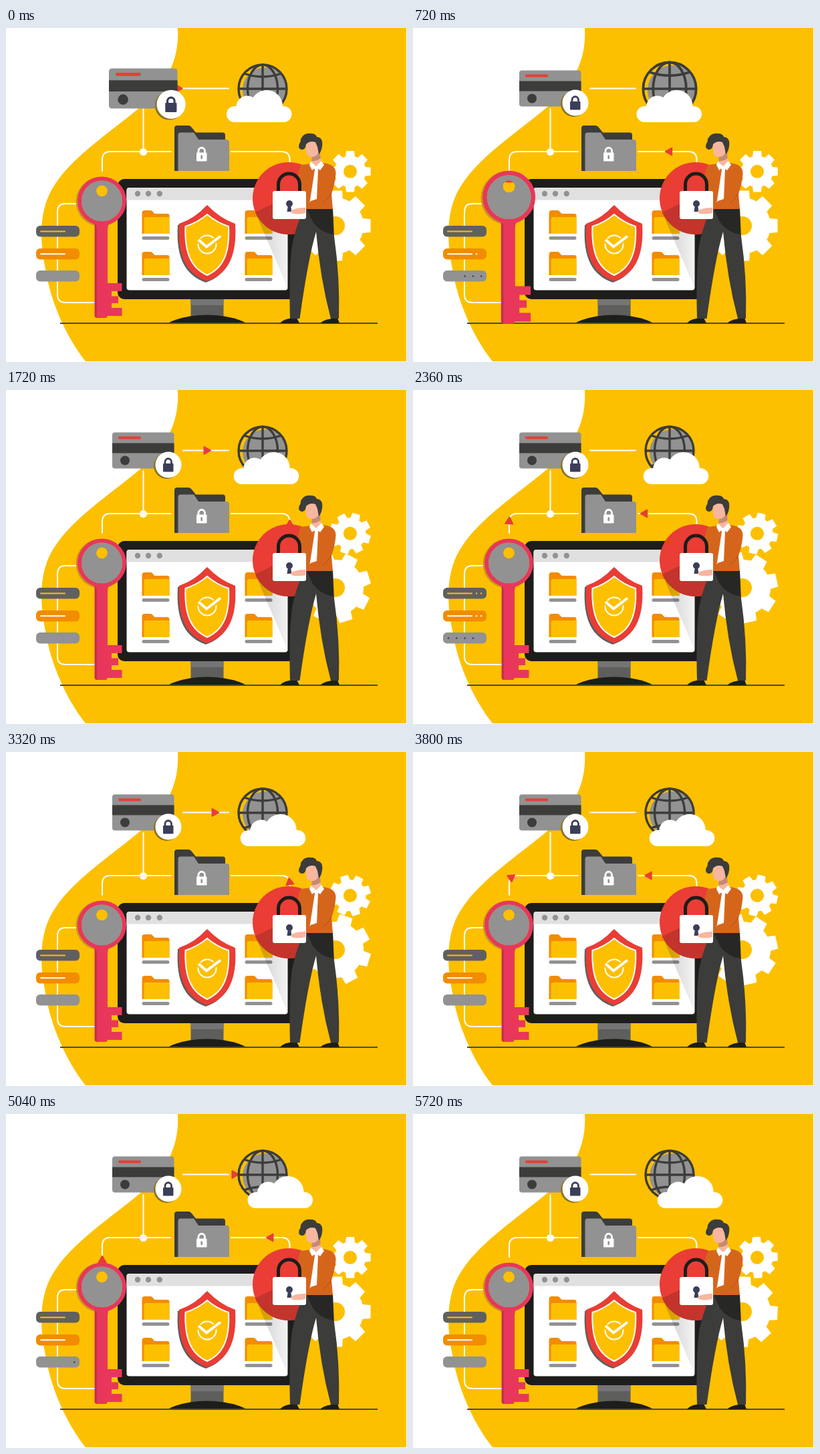
These frames come from a looping animation (600 by 500 pixels, 5760 ms). An HTML page:

```html
<!DOCTYPE html>
<html lang="en">
<head>
<meta charset="utf-8">
<title>Data security</title>
<style>
html, body { margin: 0; width: 100%; height: 100%; overflow: hidden; background: #fff }
svg { display: block; width: 600px; height: 500px }
.y { fill: #fcc000 } .g { fill: #929292 } .d { fill: #3c3c3b } .b { fill: #1d1d1b }
.r { fill: #e93d35 } .o { fill: #f28c00 } .w { fill: #fff } .n { fill: #3b3e58 } .s { fill: #f7b69f }
.line { fill: none; stroke: #fff; stroke-width: 2; stroke-linecap: round }
.wire { fill: none; stroke: #3c3c3b; stroke-width: 3.4 }
</style>
</head>
<body>
<svg viewBox="0 0 600 500">
  <defs>
    <g id="file">
      <path class="o" d="M0 35V4Q0 0 4 0H13Q15 0 17 3L19 5H38Q41 5 41 8V35Z"/>
      <path class="y" d="M3 35V13Q3 10 6 10H41V35Z"/>
      <path d="M2.5 41.5H38.5" stroke="#929292" stroke-width="5" stroke-linecap="round"/>
    </g>
    <path id="tip" class="r" d="M-4.500 -5.500L5 0L-4.500 5.500Z" stroke="#e93d35" stroke-width="2" stroke-linejoin="round"/>
    <path id="crest" d="M301 265Q320 285 343 293C346 342 332 368 301 379C270 368 256 342 259 293Q283 285 301 265Z"/>
    <linearGradient id="shade"><stop stop-color="#000" stop-opacity=".2"/><stop offset="1" stop-color="#000" stop-opacity=".05"/></linearGradient>
    <clipPath id="disc"><circle cx="423" cy="255" r="54"/></clipPath>
    <clipPath id="ball"><circle cx="384" cy="91" r="37"/></clipPath>
  </defs>

  <path class="y" d="M257 0C259 35 250 75 206 114C162 152 102 190 74 233C48 270 50 320 60 365C66 405 88 460 119 499H599V0Z"/>

  <!-- connections -->
  <g class="line">
    <path d="M265 90.500H333M205.500 121V185M337 185H412Q424.500 185 424.500 197V206M144 214V197Q144 185 156 185H247"/>
    <path d="M106 263H89Q77 263 77 275V399Q77 411 89 411H136"/>
  </g>
  <circle class="w" cx="205.500" cy="185.500" r="5.600"/>
  <path id="keyRoute" fill="none" d="M144 240V197Q144 185 156 185H262"/>
  <path id="lockRoute" fill="none" d="M424.500 206V197Q424.500 185 412 185H328"/>
  <path id="cardRoute" fill="none" d="M240 90.500H345"/>
  <use id="keyTip" href="#tip"/><use id="lockTip" href="#tip"/><use id="cardTip" href="#tip"/>

  <!-- bank card -->
  <g id="card">
    <rect class="g" x="159" y="63.500" width="92.500" height="54" rx="4"/>
    <path class="d" d="M159 79.500H251.500V94.500H159Z"/>
    <path d="M170 71.500H200" stroke="#e93d35" stroke-width="4.200" stroke-linecap="round"/>
    <circle class="d" cx="178" cy="105.500" r="7"/>
    <circle cx="240.500" cy="113.500" r="19.500" fill="#8a7426"/>
    <circle class="w" cx="243" cy="112" r="19.500"/>
    <rect class="n" x="235" y="110" width="15.500" height="12.500" rx="1"/>
    <path d="M238 111V107.500a4.700 4.700 0 0 1 9.500 0V111" fill="none" stroke="#3b3e58" stroke-width="2.800"/>
  </g>

  <!-- globe and cloud -->
  <g id="globe">
    <circle class="g" cx="388" cy="93" r="34" clip-path="url(#ball)"/>
    <g class="wire">
      <circle cx="384" cy="91" r="36"/>
      <ellipse cx="384" cy="91" rx="22.500" ry="36"/>
      <path d="M384 55V127M348 91H420M356 68Q384 78 412 68M356 114Q384 104 412 114"/>
    </g>
  </g>
  <g id="cloud" class="w">
    <rect x="330" y="117" width="97.500" height="24" rx="12"/>
    <circle cx="361" cy="118" r="16.500"/><circle cx="390" cy="117" r="24"/>
  </g>

  <!-- large folder -->
  <path class="d" d="M252 214V150Q252 146 256 146H273Q276 146 278 149L284 156.500H324Q328 156.500 328 160V214Z"/>
  <path class="g" d="M257.500 214V160Q257.500 156.500 261 156.500H281L288 167H330Q334 167 334 171V214Z"/>
  <rect class="w" x="285" y="186.500" width="15.500" height="13" rx="1"/>
  <path d="M288 188V184a4.700 4.700 0 0 1 9.500 0V188" fill="none" stroke="#fff" stroke-width="2.800"/>
  <path d="M292.700 191.500V195" stroke="#929292" stroke-width="2.600" stroke-linecap="round"/>

  <!-- gears -->
  <g id="bigGear"></g><g id="smallGear"></g>

  <!-- monitor -->
  <path fill="#5e5e5d" d="M276.500 405H325.500V434H276.500Z"/>
  <path fill="#757575" d="M276.500 405H325.500V415H276.500Z"/>
  <path class="b" d="M242 442Q265 430 300 429.500Q338 430 360 442Z"/>
  <rect class="b" x="167" y="226" width="268" height="180" rx="10"/>
  <rect class="w" x="180.500" y="239" width="241" height="153.500" rx="4"/>
  <path fill="#e0e0e0" d="M180.500 257.500V243Q180.500 239 184.500 239H417.500Q421.500 239 421.500 243V257.500Z"/>
  <g class="g"><circle cx="197" cy="248" r="4.200"/><circle cx="213" cy="248" r="4.200"/><circle cx="229.800" cy="248" r="4.200"/></g>
  <use href="#file" x="203.500" y="273"/><use href="#file" x="357.500" y="273"/>
  <use href="#file" x="203.500" y="335"/><use href="#file" x="357.500" y="335"/>
  <path fill="url(#shade)" d="M373 276L421 388V290Z"/>

  <!-- shield -->
  <use href="#crest" x="-2" y="2" fill="#5e5e5d"/>
  <use href="#crest" class="r"/>
  <path class="y" stroke="#fff" stroke-width="2" d="M301 279Q315 291 333 297C335 335 326 359 301 370C276 359 267 335 268.500 297Q287 291 301 279Z"/>
  <circle class="line" cx="301" cy="324" r="13.500"/>
  <path d="M287 317L300 328L322 311" fill="none" stroke="#fcc000" stroke-width="8"/>
  <path d="M288 317L300 327.500L321 311.500" fill="none" stroke="#fff" stroke-width="4"/>

  <!-- list -->
  <rect fill="#606060" x="45" y="296" width="65" height="16.500" rx="6"/>
  <rect class="o" x="45" y="330" width="65" height="16.500" rx="6"/>
  <rect class="g" x="45" y="363" width="65" height="16.500" rx="6"/>
  <path d="M52 304.500H88" stroke="#fcc000" stroke-width="2" stroke-linecap="round"/>
  <path d="M52 338.300H88" stroke="#fff" stroke-width="2" stroke-linecap="round"/>
  <g id="dots"></g>

  <path d="M81 442H556" stroke="#4a4a49" stroke-width="1.800"/>

  <!-- key -->
  <g id="key">
    <path fill="#c99a18" fill-rule="evenodd" d="M104.500 260a37 37 0 0 1 74 0a37 37 0 0 1 -74 0ZM135 244a8.500 8.500 0 0 0 17 0a8.500 8.500 0 0 0 -17 0Z"/>
    <path fill="#c5304f" d="M132.500 290H140V434H136Q132.500 434 132.500 430Z"/>
    <path fill="#e8375b" d="M131 289Q136 294 136 302V434H149Q151.500 434 151.500 431H173.500V419H158V412H168V401.500H158V394H173.500V382H152V302Q152 294 157 289Z"/>
    <circle cx="143.500" cy="259" r="33.500" fill="none" stroke="#e8375b" stroke-width="6"/>
    <path class="g" fill-rule="evenodd" d="M113 259a30.500 30.500 0 0 1 61 0a30.500 30.500 0 0 1 -61 0ZM135 244a8.500 8.500 0 0 0 17 0a8.500 8.500 0 0 0 -17 0Z"/>
  </g>

  <!-- man with padlock -->
  <circle class="r" cx="423" cy="255" r="54"/>
  <path clip-path="url(#disc)" fill="#c3342c" d="M368 278L402 262L450 286L446 312H370Z"/>
  <path class="b" d="M410 442Q416 434 435 434L439 442ZM470 442Q477 435 496 434L499 442Z"/>
  <path class="d" d="M446 270H489L491 312Q500 375 498 435H486Q470 375 464 305Q452 345 439.500 435H425Q423 365 428 325Q434 296 446 270Z"/>
  <path class="b" d="M450 271H489L490 309Q470 306 459 290Z" opacity=".65"/>
  <path class="w" d="M454 203H476L468 262H454Z"/>
  <path fill="#d6651c" d="M441 205L457 203L462 212L455 258L452 271H444L438 240Q434 220 441 205Z"/>
  <path fill="#d6651c" d="M474 202Q494 204 493.500 218Q492 235 487 248L489 271H446L456 259L465 256L467 212Z"/>
  <path d="M487 246Q483 256 474 262" fill="none" stroke="#b54f12" stroke-width="1"/>
  <path d="M407.500 246V234a16 16 0 0 1 32 0V246" fill="none" stroke="#1d1d1b" stroke-width="5"/>
  <rect class="w" x="399" y="244" width="50" height="42" rx="3"/>
  <circle class="n" cx="424" cy="263" r="5"/>
  <path class="n" d="M422 265H426L427.500 275H420.500Z"/>
  <path class="s" d="M426 274Q432 269 448 269V277Q436 280 427 277Z"/>
  <path fill="#c58a75" d="M458 190L470 184L471 202L464 208L457 201Z"/>
  <path class="s" d="M457 199Q464 200 471 195L472 202L464 208L457 203Z"/>
  <path class="s" d="M449 171Q460 163 469 172L468 186Q464 194 456 193Q449 192 449 184Z"/>
  <path class="w" d="M456 200L464 207L472 199L476 205L470 213L464 208L458 213L454 205Z"/>
  <path class="d" d="M441 166Q446 156 457 158Q463 158 465 163Q475 164 473 177Q472 185 468 189L466 178L463 171Q455 168 449 174Q448 183 442 182Q436 180 439 173Q441 171 441 166Z"/>
</svg>
<script>
const LOOP = 5760, BEAT = 1470;
const $ = id => document.getElementById(id);
const move = (id, value) => $(id).setAttribute('transform', value);

// Piecewise linear value from [time, value] stops; null outside them.
function track(t, stops) {
  for (let i = 1; i < stops.length; i++) {
    const [a, u] = stops[i - 1], [b, v] = stops[i];
    if (t >= a && t <= b) return u + (v - u) * (t - a) / (b - a);
  }
  return null;
}

const bump = (t, peak, width, size = .11) => 1 + size * Math.max(0, 1 - Math.abs(t - peak) / width);
const grow = (id, x, y, s) => move(id, `translate(${x} ${y}) scale(${s}) translate(${-x} ${-y})`);

function gear(id, body, outer, tooth, hole) {
  let svg = `<circle r="${(body + hole) / 2}" fill="none" stroke="#fff" stroke-width="${body - hole}"/>`;
  for (let a = 0; a < 360; a += 45)
    svg += `<path class="w" transform="rotate(${a})" d="M${body - 2} ${-tooth / 2 - 1}L${outer} ${-tooth / 2}V${tooth / 2}L${body - 2} ${tooth / 2 + 1}Z"/>`;
  $(id).innerHTML = svg;
}
gear('bigGear', 42, 52.5, 20, 14);
gear('smallGear', 23.5, 30.7, 12, 10);

// x, y, colour, on, off
const dots = [
  [95, 304.5, '#fcc000', 240, 600], [102, 304.5, '#fcc000', 340, 660],
  [95, 338.3, '#fff', 240, 780], [102, 338.3, '#fff', 340, 690],
  ...[[80, 620], [170, 700], [270, 800], [370, 900], [480, 1260]]
    .map(([on, off], i) => [53 + i * 12.3, 371.5, '#3c3c3b', on, off])
];
$('dots').innerHTML = dots.map(([x, y, c]) => `<circle cx="${x}" cy="${y}" r="1.2" fill="${c}"/>`).join('');

function arrow(id, route, at) {
  $(id).style.display = at === null ? 'none' : '';
  if (at === null) return;
  const path = $(route), p = path.getPointAtLength(at);
  const a = path.getPointAtLength(at - 1), b = path.getPointAtLength(at + 1);
  const turn = Math.atan2(b.y - a.y, b.x - a.x) * 180 / Math.PI;
  move(id, `translate(${p.x} ${p.y}) rotate(${turn})`);
}

const cardStops = [[-140, 3], [-60, 18], [30, 19], [250, 61], [380, 73], [640, 104]];
const lockStops = [[200, 0], [250, 6], [380, 12], [720, 58], [890, 95], [970, 112]];
const keyStops = [[0, 5], [40, 14], [260, 44], [500, 160]];
const keyPeaks = [680, 2100, 3520];

function draw(t) {
  const near = (t + 200) % BEAT - 200, beat = t % BEAT;
  grow('card', 205, 90.5, bump(near, 0, 80));
  grow('globe', 384, 91, bump(beat, 745, 110, .13));
  const peak = keyPeaks.find(p => Math.abs(t - p) < 160);
  grow('key', 142, 328, peak ? bump(t, peak, 160) : 1);

  arrow('cardTip', 'cardRoute', track(near, cardStops));
  arrow('lockTip', 'lockRoute', track(beat, lockStops));
  arrow('keyTip', 'keyRoute', t < 680 ? null : track((t - 680) % 1420, keyStops));

  move('cloud', `translate(${t / 160} 0)`);
  const spin = t / LOOP * 360;
  move('bigGear', `translate(493 296) rotate(${-spin})`);
  move('smallGear', `translate(515 214.800) rotate(${spin})`);

  const phase = t % 1920;
  dots.forEach(([, , , on, off], i) => {
    $('dots').children[i].style.opacity = phase >= on && phase < off ? 1 : 0;
  });
}

const start = performance.now();
function frame() {
  draw((performance.now() - start) % LOOP);
  requestAnimationFrame(frame);
}
frame();
</script>
</body>
</html>
```
